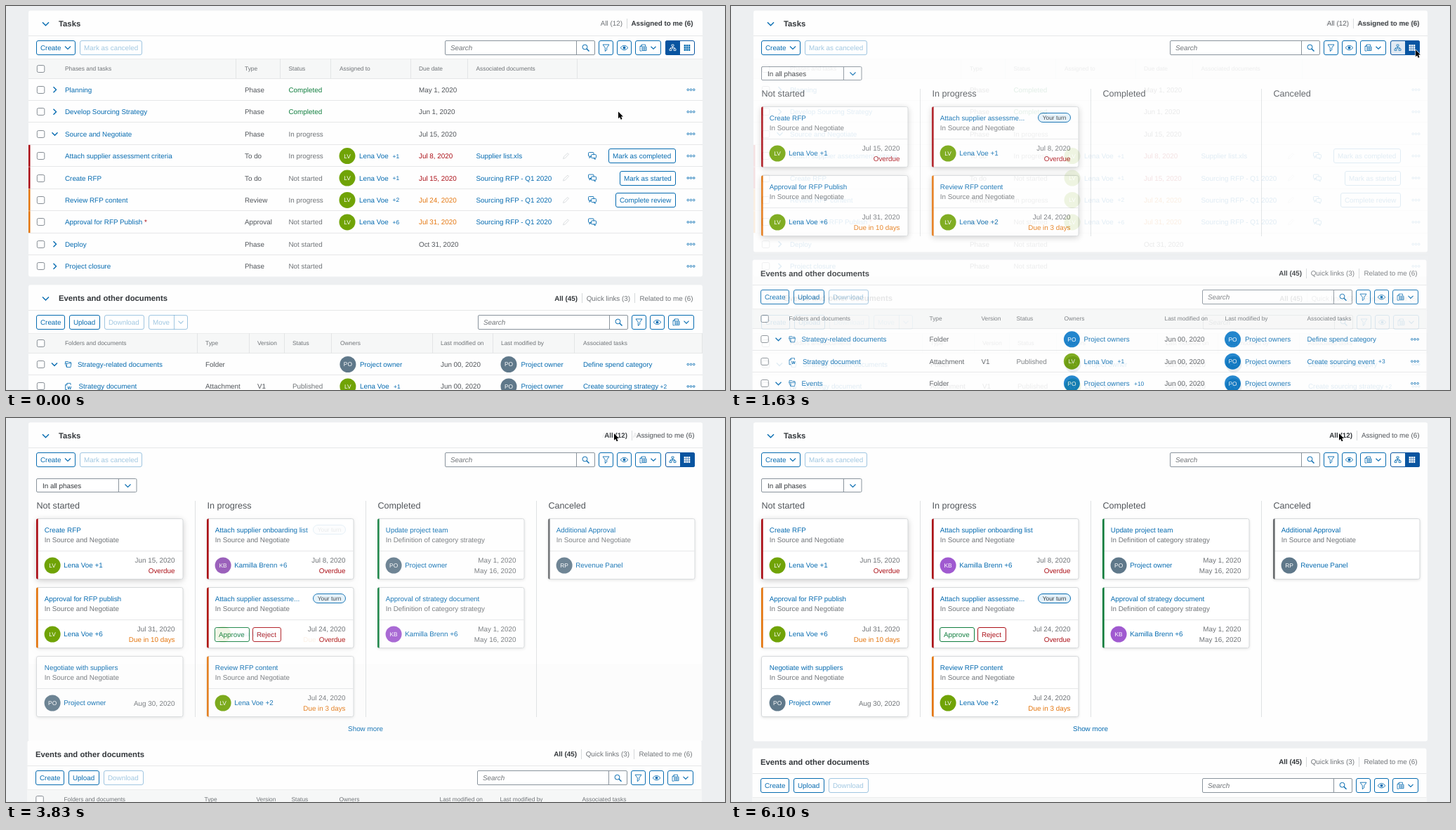
Write an HTML page with a canvas that moves like this. It is 1024 px wide and 547 px high and loops after 6.16 s.

```html
<!DOCTYPE html>
<html lang="en">
<head>
<meta charset="utf-8">
<title>Tasks board</title>
<style>
html, body { margin: 0; width: 100%; height: 100%; overflow: hidden; background: #edeff2; }
canvas { display: block; }
</style>
</head>
<body>
<canvas id="stage" width="1024" height="547"></canvas>
<script>
const W = 1024, H = 547, LOOP = 6160, ROW = 31.43;
const C = {
  page: '#edeff1', panel: '#fefefe', head: '#f6f7f7', line: '#e6e7e8', link: '#066bb0', text: '#51555a',
  title: '#32363a', soft: '#6f7377', dark: '#0854a0', hover: '#0a62b4', red: '#ab0f17', orange: '#e4760f',
  green: '#107e3e', field: '#89939c', olive: '#70a306', slate: '#5f788a', blue: '#0878c8', violet: '#a05ad0'
};
const ME = 'Lena Voe', MANAGER = 'Kamilla Brenn', GROUP = 'Revenue Panel';
const stage = document.getElementById('stage').getContext('2d');
let g = stage;

function layer(draw) {
  const canvas = document.createElement('canvas');
  canvas.width = W;
  canvas.height = H;
  g = canvas.getContext('2d');
  g.textRendering = 'geometricPrecision';
  draw();
  g = stage;
  return canvas;
}

// Centre of the pixel that holds v, so that one-pixel strokes stay sharp.
const crisp = v => Math.floor(v) + 0.5;

function text(s, x, y, color = C.text, { size = 9.85, style = '', align = 'left' } = {}) {
  g.font = `${style} ${size}px "Liberation Sans", Arial, sans-serif`;
  g.textAlign = align;
  g.fillStyle = color;
  g.fillText(s, x, y + size * 0.355);
}
const small = (s, x, y, color = C.soft) => text(s, x, y, color, { size: 8.4 });
const right = (s, x, y, color, style = '') => text(s, x, y, color, { align: 'right', style });

function rect(x, y, w, h, color) {
  g.fillStyle = color;
  g.fillRect(x, y, w, h);
}
function paint(fill, stroke, width) {
  if (fill) { g.fillStyle = fill; g.fill(); }
  if (stroke) { g.strokeStyle = stroke; g.lineWidth = width; g.stroke(); }
}
function box(x, y, w, h, r, fill, stroke, width = 1) {
  g.beginPath();
  g.roundRect(x, y, w, h, r);
  paint(fill, stroke, width);
}
function circle(x, y, r, fill, stroke, width = 1) {
  g.beginPath();
  g.arc(x, y, r, 0, 7);
  paint(fill, stroke, width);
}
function lines(color, width, ...paths) {
  g.beginPath();
  for (const p of paths)
    for (let i = 0; i < p.length; i += 2) g[i ? 'lineTo' : 'moveTo'](p[i], p[i + 1]);
  paint(null, color, width);
}
function at(x, y, draw) {
  g.save();
  g.translate(x, y);
  draw();
  g.restore();
}

// Icons are drawn around their own centre.
const chevron = (x, y, open = true, s = 4, width = 1.1) => at(x, y, () =>
  open ? lines(C.link, width, [-s, -s / 2, 0, s / 2, s, -s / 2])
       : lines(C.link, width, [-s / 2, -s, s / 2, 0, -s / 2, s]));
const lens = (x, y) => at(x, y, () => {
  circle(-1, -1, 3.4, null, C.link);
  lines(C.link, 1.4, [1.5, 1.5, 5, 5]);
});
const funnel = (x, y) => at(x, y, () =>
  lines(C.link, 0.9, [-4.5, -4.5, 4.5, -4.5, 1.2, 0, 1.2, 3, -1.2, 5, -1.2, 0, -4.5, -4.5]));
const eye = (x, y) => at(x, y, () => {
  g.beginPath();
  g.moveTo(-5.5, 0);
  g.quadraticCurveTo(0, -6.5, 5.5, 0);
  g.quadraticCurveTo(0, 6.5, -5.5, 0);
  paint(null, C.link, 0.9);
  circle(0, 0, 1.9, C.link);
});
const sheet = (x, y) => at(x, y, () => {
  lines(C.link, 0.8, [-2, 4.5, -4.5, 4.5, -4.5, -2, -2, -4.5, 3, -4.5, 3, -2], [-4.5, -2, -2, -2, -2, -4.5]);
  box(-1.5, -1.5, 6, 5.5, 0, null, C.link, 0.8);
  lines(C.link, 0.6, [-1.5, 0.5, 4.5, 0.5], [-1.5, 2.3, 4.5, 2.3], [1.5, -1.5, 1.5, 4]);
});
const folder = (x, y) => at(x, y, () =>
  lines(C.link, 0.8, [-2, 4, -2, -1.5, 4.5, -1.5, 3.5, 4, -2, 4, -4.5, -1.5, -2, -1.5], [-4, -1.5, -4, -4, 0, -4, 1, -3, 4, -3, 4, -1.5]));
const wordFile = (x, y) => at(x, y, () => {
  lines(C.link, 0.8, [-1.5, 4.5, -4, 4.5, -4, -2, -1.5, -4.5, 3.5, -4.5, 3.5, -2], [-4, -2, -1.5, -2, -1.5, -4.5]);
  text('W', 1.8, 2, C.link, { size: 6, style: 'bold', align: 'center' });
});
const chat = (x, y) => at(x, y, () => {
  box(-5.5, -5, 7.5, 5.5, 1, null, C.link, 0.9);
  lines(C.link, 0.9, [-4, 0.5, -4, 3, -1.5, 0.5]);
  box(-1.5, -2, 7, 5, 1, C.panel, C.link, 0.9);
  lines(C.link, 0.9, [2, 3, 4, 5.2, 4, 3]);
});
const pencil = (x, y) => at(x, y, () =>
  lines('#dcdfe1', 1, [-4, 4, -3, 1, 2.5, -4, 4, -2.5, -1, 3, -4, 4]));
const tree = (x, y, color) => at(x, y, () => {
  box(-1.5, -4.5, 3, 2.5, 0, null, color, 0.8);
  lines(color, 0.8, [0, -2, 0, 1.5], [-3, 1.5, -3, 0, 3, 0, 3, 1.5]);
  box(-4.5, 1.5, 3, 2.5, 0, null, color, 0.8);
  box(1.5, 1.5, 3, 2.5, 0, null, color, 0.8);
});
function grid(x, y, color) {
  for (let i = 0; i < 9; i++) rect(x - 4.4 + (i % 3) * 3.1, y - 4.4 + Math.floor(i / 3) * 3.1, 2.5, 2.5, color);
}
function dots(y, x = 975.5) {
  for (const d of [-4.2, 0, 4.2]) circle(x + d, y, 1.3, null, C.link, 0.9);
}
const check = (x, y) => box(x - 5.2, crisp(y) - 5, 10.5, 10, 2, '#fff', '#858c93');
function avatar(initials, color, x, y) {
  circle(x, y, 11.5, color);
  text(initials, x, y, '#fff', { size: 8.4, align: 'center' });
}

function button(label, x, y, w, color = C.link) {
  box(x + 0.5, crisp(y) - 10, w - 1, 20, 2.5, '#fff', color);
  if (label) text(label, x + 6, y, color);
}
function faded(draw) {
  g.globalAlpha = 0.38;
  draw();
  g.globalAlpha = 1;
}
function search(x, y) {
  const top = crisp(y) - 10;
  box(x + 0.5, top, 213, 20, 1.5, '#fff', C.field);
  lines(C.field, 1, [x + 187.5, top, x + 187.5, top + 20]);
  text('Search', x + 8, y, C.soft, { style: 'italic' });
  lens(x + 200.5, y);
}
function viewTools(x, y) {
  button('', x, y, 21); funnel(x + 10.5, y);
  button('', x + 26, y, 21); eye(x + 36.5, y);
  button('', x + 52, y, 37); sheet(x + 63.5, y); chevron(x + 78, y, true, 3.5);
}
function panel(x, top, bottom) {
  box(x, top, 960, bottom - top, 3, C.panel);
  rect(x, Math.round(top + 35.9), 960, 1, C.line);
}

function taskHeader(board, all, bottom, gridColor) {
  panel(32, 6.5, bottom);
  chevron(56.5, 25.5, true, 4.5, 1.4);
  text('Tasks', 75, 25, C.title, { size: 11.3, style: 'bold' });
  const edge = board ? 980.5 : 978.5;
  const bar = all ? 891 : edge - 94.5;
  right('Assigned to me (6)', edge, 25, all ? C.text : C.title, all ? '' : 'bold');
  rect(bar, 18, 1, 14, '#d5d8da');
  right('All (12)', bar - 6, 25, all ? C.title : board ? C.text : C.soft, all ? 'bold' : '');

  button('Create', 43, 59.5, 56);
  chevron(88, 59.5);
  faded(() => button('Mark as canceled', 105, 59.5, 89));
  search(625, 59.5);
  viewTools(844, 59.5);
  box(939.5, 49.5, 41, 20, 2.5, '#fff', C.dark);
  if (board) box(960, 49, 21, 21, [0, 2.5, 2.5, 0], C.dark);
  else {
    box(939, 49, 21, 21, [2.5, 0, 0, 2.5], C.dark);
    if (gridColor) box(960, 49, 21, 21, [0, 2.5, 2.5, 0], gridColor);
  }
  tree(949.5, 59.5, board ? C.link : '#fff');
  grid(970, 59.5, board || gridColor ? '#fff' : C.link);
}

function headCells(top, cells, dividers, dx = 0) {
  rect(32 + dx, top, 960, 28.5, C.head);
  rect(32 + dx, top, 960, 1, '#eceded');
  rect(32 + dx, top + 28, 960, 1, C.line);
  check(49.5 + dx, top + 14.2);
  for (const [label, x] of cells) small(label, x + dx, top + 14);
  for (const x of dividers) rect(x, top, 1, 28.5, '#e3e5e6');
}

const SOURCING = 'Sourcing RFP - Q1 2020';
const TASKS = [
  { name: 'Planning', type: 'Phase', status: 'Completed', due: 'May 1, 2020' },
  { name: 'Develop Sourcing Strategy', type: 'Phase', status: 'Completed', due: 'Jun 1, 2020' },
  { name: 'Source and Negotiate', type: 'Phase', status: 'In progress', due: 'Jul 15, 2020', open: true },
  { name: 'Attach supplier assessment criteria', type: 'To do', status: 'In progress', due: 'Jul 8, 2020', tone: C.red, more: '+1', doc: 'Supplier list.xls', action: 'Mark as completed', w: 96 },
  { name: 'Create RFP', type: 'To do', status: 'Not started', due: 'Jul 15, 2020', tone: C.red, more: '+1', doc: SOURCING, action: 'Mark as started', w: 80 },
  { name: 'Review RFP content', type: 'Review', status: 'In progress', due: 'Jul 24, 2020', tone: C.orange, more: '+2', doc: SOURCING, action: 'Complete review', w: 86 },
  { name: 'Approval for RFP Publish', type: 'Approval', status: 'Not started', due: 'Jul 31, 2020', tone: C.orange, more: '+6', doc: SOURCING, required: true },
  { name: 'Deploy', type: 'Phase', status: 'Not started', due: 'Oct 31, 2020' },
  { name: 'Project closure', type: 'Phase', status: 'Not started', due: '' }
];

function taskRow(t, i) {
  const y = 119.3 + ROW * i;
  if (i < TASKS.length - 1) rect(32, Math.round(y + ROW / 2) - 1, 960, 1, C.line);
  check(49.5, y);
  if (t.type === 'Phase') chevron(69.5, y, !!t.open, 4, 1.4);
  text(t.name, 84, y, C.link);
  if (t.required) text('*', 197, y, C.red);
  text(t.type, 340, y);
  text(t.status, 402.5, y, t.status === 'Completed' ? C.green : C.soft);
  text(t.due, 588, y, t.tone || C.text);
  dots(y);
  if (!t.tone) return;
  rect(32, y - ROW / 2, 2.5, ROW - 0.5, t.tone);
  avatar('LV', C.olive, 486, y);
  text(ME, 503, y, C.link);
  small(t.more, 550.5, y, C.link);
  text(t.doc, 669.5, y, C.link);
  pencil(797.5, y);
  chat(835, y);
  if (t.action) button(t.action, 954 - t.w, y, t.w);
}

function documents(top, board) {
  const dx = board ? -1.5 : 0;
  panel(32 + dx, top, 560);
  if (!board) chevron(56.5, top + 19.5, true, 4.5, 1.4);
  text('Events and other documents', board ? 42 : 75, top + 19.2, C.title, { size: 11.3, style: 'bold' });
  const y = top + 53.2;
  at(Math.round(dx), 0, () => {
    right('All (45)', 814, top + 19.2, C.title, 'bold');
    right('Quick links (3)', 889, top + 19.2, C.soft);
    right('Related to me (6)', 978.5, top + 19.2, C.soft);
    for (const x of [820, 895]) rect(x, Math.round(top + 12), 1, 14, '#d5d8da');
    button('Create', 43, y, 41);
    button('Upload', 90, y, 44);
    faded(() => {
      button('Download', 140, y, 57);
      if (board) return;
      button('Move', 203, y, 56);
      lines(C.link, 1, [239.5, y - 10, 239.5, y + 10]);
      chevron(249, y, true, 3.5);
    });
    search(672, y);
    viewTools(891, y);
  });
  headCells(Math.round(top + 69),
    [['Folders and documents', 84], ['Type', 284], ['Version', 358], ['Status', 408], ['Owners', 476],
     ['Last modified on', 619], ['Last modified by', 705], ['Associated tasks', 822]],
    board ? [] : [272, 346, 396, 463, 607, 693, 809, 991], dx);

  const owner = board ? 'Project owners' : 'Project owner';
  const ownerColor = board ? C.blue : C.slate;
  const rows = [
    { name: 'Strategy-related documents', task: 'Define spend category' },
    { name: 'Strategy document', file: true, more: '+1', task: board ? 'Create sourcing event' : 'Create sourcing strategy', extra: board ? '+3' : '+2' },
    { name: 'Events', more: '+10', task: '' }
  ];
  at(dx, 0, () => rows.forEach((r, i) => {
    const ry = top + 113.3 + ROW * i;
    rect(32, Math.round(ry + ROW / 2) - 1, 960, 1, C.line);
    check(49.5, ry);
    if (r.file) wordFile(88.5, ry);
    else { chevron(69, ry, true, 4, 1.4); folder(88.5, ry); }
    text(r.name, r.file ? 103.5 : 102, ry, C.link);
    text(r.file ? 'Attachment' : 'Folder', 284, ry);
    if (r.file) { text('V1', 358, ry); text('Published', 408, ry, C.soft); }
    avatar(r.file ? 'LV' : 'PO', r.file ? C.olive : ownerColor, 486.9, ry);
    text(r.file ? ME : owner, 504, ry, C.link);
    if (r.more) small(r.more, r.file ? 552 : 575.5, ry, C.link);
    text('Jun 00, 2020', 619, ry);
    avatar('PO', ownerColor, 716, ry);
    text(owner, 733.5, ry, C.link);
    text(r.task, 822, ry, C.link);
    if (r.extra) small(r.extra, board ? 923.5 : 931.5, ry, C.link);
    dots(ry);
  }));
}

function drawList(gridColor) {
  rect(0, 0, W, H, C.page);
  taskHeader(false, false, 385.5, gridColor);
  headCells(75, [['Phases and tasks', 84], ['Type', 340], ['Status', 402.5], ['Assigned to', 475],
    ['Due date', 588], ['Associated documents', 669.5]], [327, 390, 462, 576, 657, 813]);
  TASKS.forEach(taskRow);
  documents(397.2, false);
}

const PEOPLE = { LV: [ME, C.olive], KB: [MANAGER, C.violet], PO: ['Project owner', C.slate], RP: [GROUP, C.slate] };
const PHASE = 'In Source and Negotiate', DEFINITION = 'In Definition of category strategy';
const card = (title, who, more, tone, dates, extra = {}) => ({ title, who, more, tone, dates, phase: PHASE, ...extra });
const late = 'Overdue', ten = 'Due in 10 days', three = 'Due in 3 days';
const review = card('Review RFP content', 'LV', ' +2', C.orange, ['Jul 24, 2020', three]);
const MINE = [
  [card('Create RFP', 'LV', ' +1', C.red, ['Jul 15, 2020', late]),
   card('Approval for RFP Publish', 'LV', ' +6', C.orange, ['Jul 31, 2020', ten])],
  [card('Attach supplier assessme...', 'LV', ' +1', C.red, ['Jul 8, 2020', late], { turn: true }), review], [], []
];
const ALL = [
  [card('Create RFP', 'LV', ' +1', C.red, ['Jun 15, 2020', late], { raised: true }),
   card('Approval for RFP publish', 'LV', ' +6', C.orange, ['Jul 31, 2020', ten]),
   card('Negotiate with suppliers', 'PO', '', null, ['Aug 30, 2020'])],
  [card('Attach supplier onboarding list', 'KB', ' +6', C.red, ['Jul 8, 2020', late]),
   card('Attach supplier assessme...', '', '', C.red, ['Jul 24, 2020', late], { turn: true }), review],
  [card('Update project team', 'PO', '', C.green, ['May 1, 2020', 'May 16, 2020'], { phase: DEFINITION }),
   card('Approval of strategy document', 'KB', ' +6', C.green, ['May 1, 2020', 'May 16, 2020'], { phase: DEFINITION })],
  [card('Additional Approval', 'RP', '', '#6a6d70', [])]
];

function drawCard(c, x, y, raised) {
  g.save();
  g.shadowColor = raised ? 'rgba(0,0,0,.22)' : 'rgba(0,0,0,.14)';
  g.shadowBlur = raised ? 8 : 4;
  g.shadowOffsetY = raised ? 2 : 1;
  box(x, y, 208.5, 86, 2.5, '#fff');
  g.restore();
  box(x, y, 208.5, 86, 2.5, '#fff', '#d6d9db');
  rect(x, y + 45.5, 208.5, 1, C.line);
  if (c.tone) box(x - 0.5, y, 2.7, 86, [2, 0, 0, 2], c.tone);
  text(c.title, x + 11.3, y + 16, C.link);
  text(c.phase, x + 11.3, y + 30, C.soft);
  if (c.turn) {
    box(x + 151, y + 9, 46, 13, 6.5, '#e3f1fa', C.link);
    text('Your turn', x + 174, y + 15.7, C.title, { size: 8.4, align: 'center' });
  }
  if (c.who) {
    const [name, color] = PEOPLE[c.who];
    avatar(c.who, color, x + 22.6, y + 66.5);
    text(name + c.more, x + 38.7, y + 66.5, C.link);
  } else {
    button('Approve', x + 10.5, y + 66.6, 50, C.green);
    button('Reject', x + 64.5, y + 66.6, 41, C.red);
  }
  c.dates.forEach((d, i) => {
    const color = d === late ? C.red : d.startsWith('Due') ? C.orange : C.soft;
    right(d, x + 197, y + (c.dates.length === 1 ? 67 : 59.5 + 14.2 * i), color);
  });
}

function drawBoard(columns, all) {
  taskHeader(true, all, all ? 460.5 : 350.5);
  box(43.5, 86.5, 142.5, 19, 1.5, '#fff', C.field);
  lines(C.field, 1, [160.5, 86.5, 160.5, 105.5]);
  text('In all phases', 52, 96.5, C.title);
  chevron(173.5, 96.5);
  ['Not started', 'In progress', 'Completed', 'Canceled'].forEach((label, i) => {
    const x = 43.5 + 243 * i;
    text(label, x, 125, C.text, { size: 12.6 });
    if (i) rect(x - 17.5, 118, 1, all ? 308 : 210, '#dfe1e3');
    columns[i].forEach((c, n) => drawCard(c, x, 143.5 + 98 * n, c.raised || !all));
  });
  if (all) text('Show more', 512, 443, C.link, { align: 'center' });
}

function drawCursor(x, y, hand) {
  g.save();
  g.translate(x, y);
  g.lineJoin = 'round';
  g.beginPath();
  const p = hand
    ? [-1.8, 0.8, -0.8, 0, 0.3, 0.8, 0.5, 3.6, 4.7, 4.8, 5.8, 6.2, 5.2, 9, 4.3, 11, -0.2, 11, -3, 7.6, -2.6, 6.6, -1.4, 7]
    : [0, 0, 0, 9.8, 2.2, 7.8, 3.7, 11.3, 5.5, 10.5, 4, 7.1, 6.9, 6.9];
  for (let i = 0; i < p.length; i += 2) g.lineTo(p[i], p[i + 1]);
  g.closePath();
  g.strokeStyle = hand ? '#111' : 'rgba(255,255,255,.9)';
  g.lineWidth = hand ? 1.1 : 1.4;
  g.fillStyle = hand ? '#fff' : '#000';
  g.stroke();
  g.fill();
  if (hand) lines('#111', 0.7, [0.8, 6.5, 0.8, 9], [2.4, 6.5, 2.4, 9], [4, 6.5, 4, 9]);
  g.restore();
}

const list = layer(() => drawList());
const listHover = layer(() => drawList(C.hover));
const docs = layer(() => documents(361.5, true));
const mine = layer(() => { rect(0, 0, W, H, C.page); drawBoard(MINE, false); });
const mineWithDocs = layer(() => { g.drawImage(mine, 0, 0); g.drawImage(docs, 0, 0); });
const everything = layer(() => drawBoard(ALL, true));

const SWITCH = 1500, FILTER = 3695, FADE = 200;
const progress = (t, start, length) => Math.min(1, Math.max(0, (t - start) / length));
const easeOut = p => 1 - (1 - p) ** 2;
const smooth = p => p * p * (3 - 2 * p);

function frame(now) {
  const t = now % LOOP;
  const go = smooth(progress(t, 300, 900));
  const leave = smooth(progress(t, 2480, 920));
  const x = 872 + 103 * go - 109 * leave;
  const y = 150.5 - 88 * go - 40.5 * leave;
  const overGrid = x > 960 && y < 70;

  if (t < SWITCH + FADE) {
    stage.drawImage(overGrid ? listHover : list, 0, 0);
    stage.globalAlpha = easeOut(progress(t, SWITCH, FADE));
    stage.drawImage(mineWithDocs, 0, 0);
  } else {
    const p = easeOut(progress(t, FILTER, FADE));
    stage.drawImage(mine, 0, 0);
    stage.drawImage(docs, 0, Math.round(109 * p));
    stage.globalAlpha = p;
    stage.drawImage(everything, 0, 0);
  }
  stage.globalAlpha = 1;
  drawCursor(x, y, overGrid && t < SWITCH + 60);
  requestAnimationFrame(frame);
}
requestAnimationFrame(frame);
</script>
</body>
</html>
```
